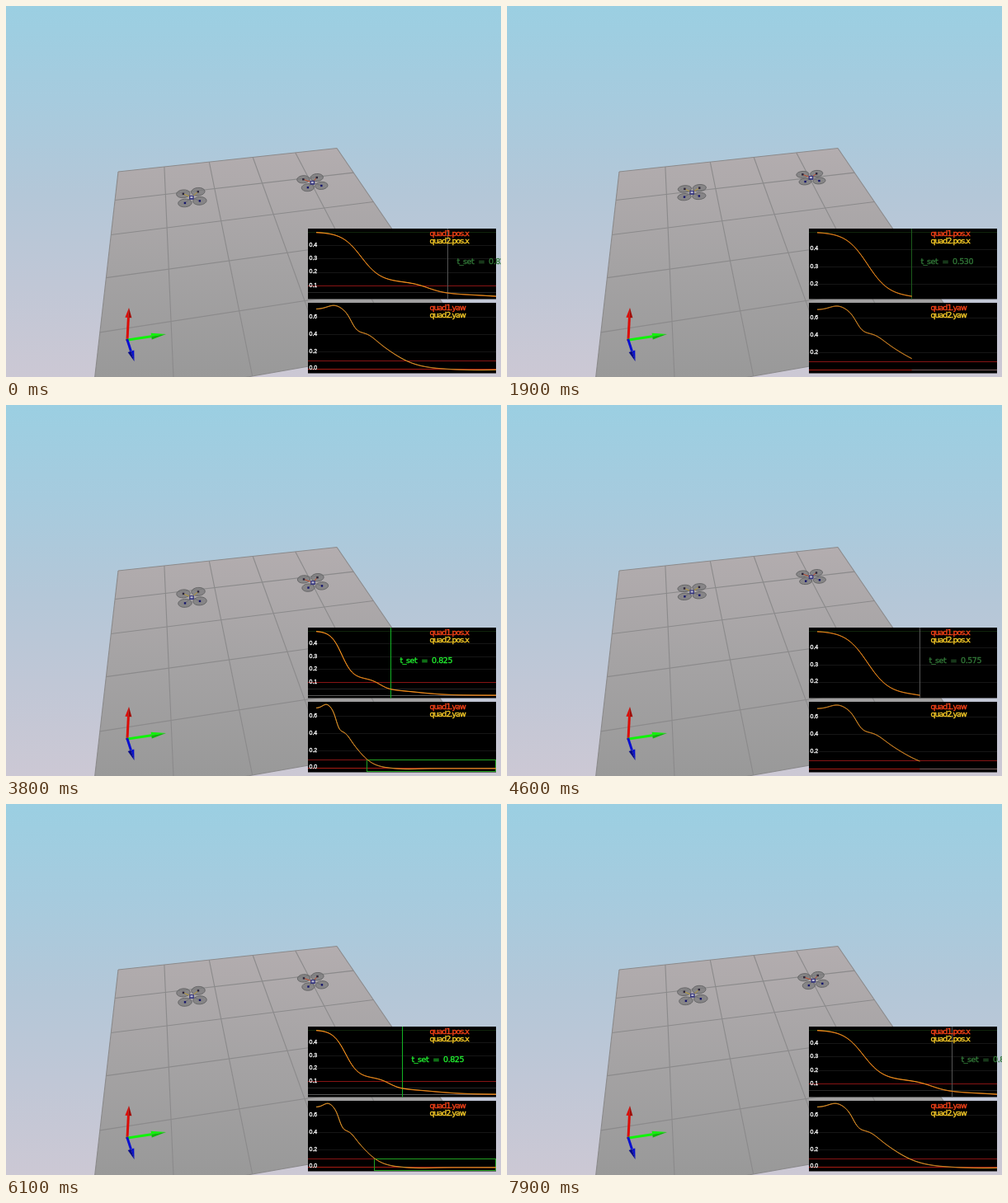
Animation, 600 px wide and 450 px high, one loop 8000 ms. Source, as an HTML page with a canvas:

```html
<!DOCTYPE html>
<html>
<head>
<meta charset="utf-8">
<style>
html, body { margin: 0; width: 100%; height: 100%; overflow: hidden; background: #b4c8d8 }
canvas { display: block }
</style>
</head>
<body>
<canvas id="stage" width="600" height="450"></canvas>
<script>
const ctx = document.getElementById('stage').getContext('2d');
const SETTLE = 0.825, YAW_SETTLE = 0.556;
const X0 = 376, X1 = 594, LEFT = 366;
const WIDE = '9.5px "DejaVu Sans", sans-serif', SMALL = '7px "Liberation Sans", sans-serif';

// Settling responses built from smooth drops and humps
const drop = (t, mid, width) => 1 / (1 + Math.exp((t - mid) / width));
const hump = (t, mid, width) => Math.exp(-(((t - mid) / width) ** 2) / 2);
const posAt = t => .37 * drop(t, .282, .061) + .085 * drop(t, .7, .055) + .045 * drop(t, 1.13, .16);
const yawAt = t => .26 * drop(t, .222, .02) + .44 * drop(t, .455, .09) +
  .05 * hump(t, .115, .045) + .044 * hump(t, .32, .05) - .008 * hump(t, 1, .12);

function lowest(fn, t) {
  let low = fn(t);
  for (let s = 0; s < t; s += .02) low = Math.min(low, fn(s));
  return low;
}

// Perspective map of the unit floor square
function floor(u, v) {
  const w = 1 + .069 * u - .441 * v;
  return [(136 + 292.7 * u - 77.9 * v) / w, (201 - 16.6 * u + 69 * v) / w];
}

function line(points, color, width = 1) {
  ctx.beginPath();
  points.forEach(p => ctx.lineTo(...p));
  ctx.strokeStyle = color;
  ctx.lineWidth = width;
  ctx.stroke();
}

function gradient(y0, y1, ...colors) {
  const g = ctx.createLinearGradient(0, y0, 0, y1);
  colors.forEach((c, i) => g.addColorStop(i / (colors.length - 1), c));
  return g;
}

function text(str, x, y, color, font, spacing = 0) {
  ctx.font = font;
  ctx.letterSpacing = spacing + 'px';
  ctx.fillStyle = ctx.strokeStyle = color;
  ctx.lineWidth = .35;
  ctx.fillText(str, x, y);
  ctx.strokeText(str, x, y);
}

function scene() {
  ctx.fillStyle = gradient(0, 450, '#9bcfe2', '#a6cbde', '#b3c7d8', '#c0c7d6', '#ccc8d4');
  ctx.fillRect(0, 0, 600, 450);
  ctx.beginPath();
  [[0, 0], [1, 0], [1, 1], [0, 1]].forEach(p => ctx.lineTo(...floor(...p)));
  ctx.fillStyle = gradient(172, 450, '#b3adaf', '#a5a3a4', '#999');
  ctx.fill();
  for (let i = 0; i <= 5; i++) {
    line([floor(i / 5, 0), floor(i / 5, 1)], '#8b8a8b', 1.1);
    line([floor(0, i / 5), floor(1, i / 5)], '#8b8a8b', 1.1);
  }
  arrow(149, 366, 12, '#dc0c06', '#a00c06');
  arrow(194, 398, 18, '#10f408', '#0cb808');
  arrow(155.5, 431, 13, '#0810d0', '#060a88');
}

function arrow(x, y, head, color, shade) {
  const ox = 147, oy = 405, len = Math.hypot(x - ox, y - oy);
  ctx.save();
  ctx.translate(ox, oy);
  ctx.rotate(Math.atan2(y - oy, x - ox));
  line([[-1, 0], [len - head, 0]], color, 3);
  for (const [side, c] of [[-4, color], [4, shade]]) {
    ctx.beginPath();
    ctx.moveTo(len, 0);
    ctx.lineTo(len - head, side);
    ctx.lineTo(len - head, 0);
    ctx.fillStyle = c;
    ctx.fill();
  }
  ctx.restore();
}

// fwd and right are the projected body axes at zero yaw
function quad(x, y, fwd, right, lean, rx, ry, color, pos, yaw) {
  const dy = -57 * pos + 15 * pos * pos, k = 1 - .1 * pos;
  const tilt = 1 - 1.2 * Math.min(pos, .5 - pos);
  const c = Math.cos(yaw), s = Math.sin(yaw);
  const place = (f, r) => {
    const a = f * c - r * s, b = r * c + f * s;
    return [k * (a * fwd[0] + b * right[0]), k * (a * fwd[1] * tilt + b * right[1])];
  };
  const rotors = [[1, -1], [1, 1], [-1, -1], [-1, 1]].map(p => place(...p));
  ctx.save();
  ctx.translate(x + lean * dy, y + dy);
  for (const [px, py] of rotors) {
    ctx.beginPath();
    ctx.ellipse(px, py, rx * k, ry * k * tilt, -.08, 0, 7);
    ctx.fillStyle = 'rgba(118,118,120,.7)';
    ctx.fill();
    ctx.strokeStyle = '#626264';
    ctx.lineWidth = .9;
    ctx.stroke();
  }
  rotors.forEach((p, i) => {
    line([[0, 0], p], i < 2 ? color : '#707076', 1);
    ctx.fillStyle = i < 2 ? '#2c2438' : '#14146c';
    ctx.fillRect(p[0] - 1.2, p[1] - 1.2, 2.4, 2.4);
  });
  ctx.fillStyle = '#34347c';
  ctx.fillRect(-2.8, -2.3, 5.6, 5);
  ctx.fillStyle = '#b8b8d0';
  ctx.fillRect(-1.5, -1.2, 3, 2.2);
  ctx.restore();
}

function panel(top, t, cfg) {
  const xAt = v => X0 + (X1 - X0) * v / Math.max(1.008, t);
  const row = (v, color, x = X1) => {
    const y = Math.floor(cfg.y(v)) + .5;
    line([[LEFT, y], [x, y]], color);
  };
  ctx.save();
  ctx.beginPath();
  ctx.rect(LEFT, top, X1 - LEFT, 85.5);
  ctx.clip();
  ctx.fillStyle = '#000';
  ctx.fillRect(LEFT, top, X1 - LEFT, 86);
  cfg.ticks.forEach(v => row(v, '#161616'));
  cfg.back(row, xAt);
  const trace = d => {
    const pts = [], steps = 220;
    for (let i = 0; i <= steps; i++) {
      const s = t * i / steps;
      pts.push([xAt(s), cfg.y(cfg.fn(s)) + d]);
    }
    return pts;
  };
  line(trace(.3), '#c84c10');
  line(trace(0), cfg.color);
  cfg.ticks.forEach(v => {
    if (v >= cfg.low - .02) text(v.toFixed(1), 367.5, Math.min(cfg.y(v) + 1.3, 441), '#f4f4f4', SMALL);
  });
  ['#ff4418', '#ffd028'].forEach((c, i) =>
    text(`quad${i + 1}.${cfg.name}`, 513.5, top + 9 + 9 * i, c, WIDE, -1));
  ctx.restore();
}

function draw(ms) {
  const period = 2644;
  const p = (ms - 1237.5 + period) % period;
  const t = Math.min(2, p < 1412.5 ? p * .0008 : 1.13 + (p - 1412.5) * .000737);
  const pos = posAt(t), yaw = yawAt(t);
  const posLow = Math.min(.49, lowest(posAt, t)), yawLow = lowest(yawAt, t);
  const done = t > 1.25;
  scene();
  quad(225, 233.4, [-1, -5.75], [9, -1.25], .12, 8.3, 5, '#b89c38', pos, yaw);
  quad(372, 215.4, [-2.75, -5.1], [8.25, -1.1], .5, 7.7, 4.7, '#c04a2c', pos, yaw);

  const set = Math.min(t, SETTLE);
  const setX = Math.floor(X0 + (X1 - X0) * set / Math.max(1.008, t)) + .5;
  panel(270, t, {
    name: 'pos.x', fn: posAt, low: posLow, ticks: [.4, .3, .2, .1], color: '#f4a020',
    y: v => 274 + (.5 - v) / (.5 - posLow) * 78,
    back(row) {
      row(.5, '#10240c');
      row(.05, '#262626');
      row(0, '#555');
      row(.1, '#861414');
      line([[setX, 270], [setX, 356]], done ? '#12b424' : t < YAW_SETTLE ? '#1c5c1c' : '#555');
    }
  });
  panel(360, t, {
    name: 'yaw', fn: yawAt, low: yawLow, ticks: [.6, .4, .2, 0], color: '#cc9a2c',
    y: v => 441.5 - 105 * (v - Math.min(0, yawLow)),
    back(row, xAt) {
      row(.1, '#861414');
      row(0, '#7c6060');
      row(0, '#a81c14', xAt(t));
      if (t > 1.55) {
        const x = Math.floor(xAt(YAW_SETTLE)) + .5;
        ctx.strokeStyle = '#22a022';
        ctx.strokeRect(x, 430.5, X1 - .5 - x, 14);
      }
    }
  });
  const shown = Math.round(set * 200) / 200;
  text(`t_set  =  ${shown.toFixed(3)}`, setX + 11, 313, done ? '#22f030' : '#327838', WIDE, -.45);
}

function tick() {
  draw(Math.floor(performance.now() % 8000 / 100) * 100);
  requestAnimationFrame(tick);
}
tick();
</script>
</body>
</html>
```
